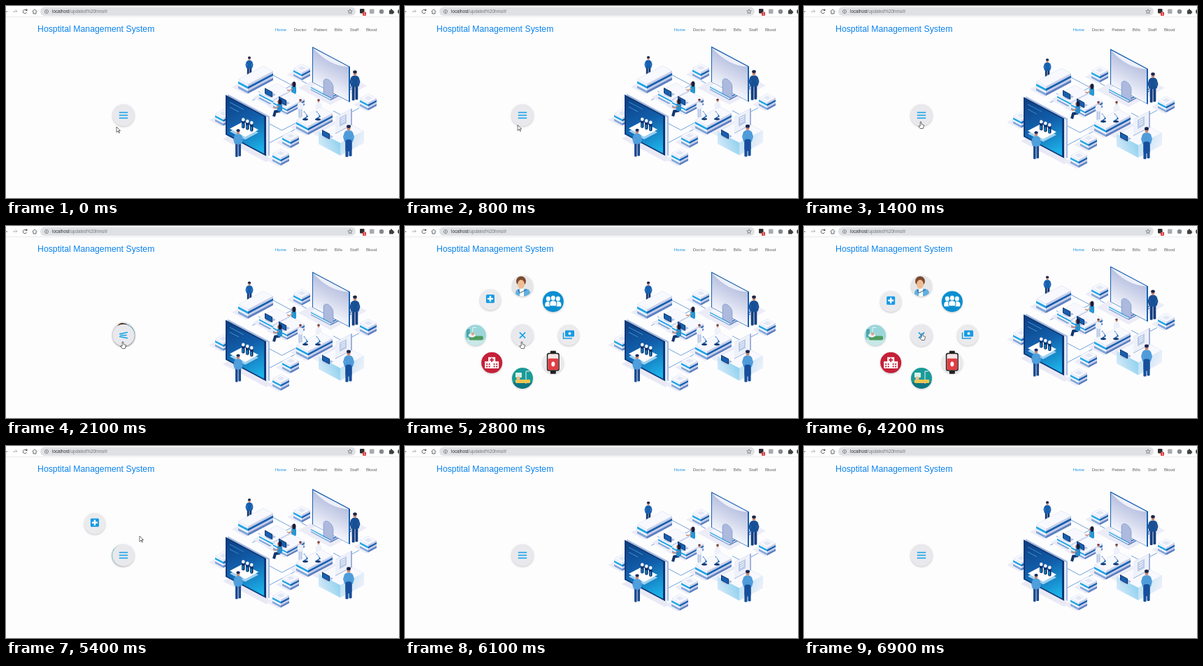
An HTML page with a canvas for the animation above (7000 ms loop, 562 by 275 pixels).

```html
<!DOCTYPE html>
<html lang="en">
<head>
<meta charset="utf-8">
<style>
html, body { margin: 0; height: 100%; overflow: hidden; background: #fdfdfe; }
canvas { display: block; }
</style>
</head>
<body>
<canvas id="stage" width="562" height="275"></canvas>
<script>
const c = document.getElementById('stage').getContext('2d');
const NAVY = '#12366f', BLUE = '#1760b0', CYAN = '#1ba5e6', PALE = '#eef1fa', LILAC = '#c6cee9';
const SKIN = '#c98a78', GREY = '#5f6368', WHITE = '#fff', BUTTON = '#ebebee';
const LOOP = 7000, OPEN = 2050, CLOSE = 4730, HUB = [168, 156.5];

// ---------- drawing helpers ----------
function rect(fill, x, y, w, h, r = 0) {
  c.beginPath(); c.roundRect(x, y, w, h, r);
  c.fillStyle = fill; c.fill();
}
function oval(fill, x, y, rx, ry = rx) {
  c.beginPath(); c.ellipse(x, y, rx, ry, 0, 0, 7);
  c.fillStyle = fill; c.fill();
}
function trace(...pts) {
  c.beginPath();
  for (let i = 0; i < pts.length; i += 2) c.lineTo(pts[i], pts[i + 1]);
}
function line(color, width, ...pts) {
  trace(...pts);
  c.strokeStyle = color; c.lineWidth = width; c.stroke();
}
function ring(color, width, x, y, r, end = 7) {
  c.beginPath(); c.arc(x, y, r, .3, end);
  c.strokeStyle = color; c.lineWidth = width; c.stroke();
}
function cross(color, x, y, size, width) {
  rect(color, x - size, y - width / 2, size * 2, width);
  rect(color, x - width / 2, y - size, width, size * 2);
}
function text(str, x, y, size, color) {
  c.font = `${size}px "Liberation Sans", Arial, sans-serif`;
  c.fillStyle = color; c.fillText(str, x, y);
  return x + c.measureText(str).width;
}
function fade(w, h, ...colors) {
  const g = c.createLinearGradient(0, 0, w, h);
  colors.forEach((color, i) => g.addColorStop(i / (colors.length - 1), color));
  return g;
}
function within(matrix, draw) {
  c.save(); c.transform(...matrix); draw(); c.restore();
}
const at = (x, y, draw) => within([1, 0, 0, 1, x, y], draw);

// ---------- isometric parts ----------
const S = 0.53;
const leftWall = (x, y, draw) => within([1, S, 0, 1, x, y], draw);
const rightWall = (x, y, draw) => within([1, -S, 0, 1, x, y], draw);
const floor = (x, y, draw) => within([1, -S, -1, -S, x, y], draw);

// (x, y) is the front corner of the top; a runs back left, b back right
function box(x, y, a, b, h) {
  floor(x, y + h, () => rect('#ececf7', -3, 0, b + 3, a + 6));
  const bands = (left, w, colors) => colors.forEach((color, i) => rect(color, left, h * i * .25, w, h * .26));
  leftWall(x, y, () => bands(-a, a, [PALE, CYAN, PALE, '#7fa6d8']));
  rightWall(x, y, () => bands(0, b, [LILAC, BLUE, LILAC, '#5d7fc0']));
  floor(x, y, () => {
    rect('#dfe5f4', 0, 0, b, a);
    rect('#f8f9fe', .6, .6, b - 1.2, a - 1.2);
  });
}
function crate(x, y) {
  box(x, y, 12, 12, 11);
  floor(x, y, () => rect('#e3e8f6', 3, 3, 6, 6));
}
function cable(x0, y0, x1, y1) {
  const run = (x1 - x0 + (y1 - y0) / S) / 2;
  line('#4f8bd0', .8, x0, y0, x0 + run, y0 + run * S, x1, y1);
}
function person(x, feet, h, coat, legs, hair = '#1b2447') {
  within([h / 40, 0, 0, h / 40, x, feet - h], () => {
    rect(legs, -4, 18, 3.6, 22, 1);
    rect(legs, .4, 18, 3.6, 21, 1);
    rect(coat, -4.5, 7, 9, 15, 3);
    for (const side of [-1, 1]) line(coat, 2.2, side * 4, 9, side * 5.8, 15, side * 4, 21);
    oval(SKIN, 0, 4, 2.2, 3.2);
    oval(hair, 0, 2, 2.6, 2);
  });
}
function seated(x, y, shirt) {
  line(NAVY, 4, x + 1, y + 7, x - 6, y + 8, x - 8, y + 15);
  rect(shirt, x - 3, y - 4, 7, 12, 3);
  line(SKIN, 1.5, x - 1, y, x - 6, y + 3, x - 9, y + 2);
  oval(SKIN, x - 1, y - 6, 2, 2.8);
  oval('#151e40', x + 1, y - 6, 2.5, 4);
}
function laptop(x, y) {
  floor(x, y + 8, () => rect('#a9bbdf', 0, 0, 8, 8));
  leftWall(x - 8, y - 6, () => {
    rect(NAVY, 0, 0, 11, 8);
    rect(BLUE, 1, 1, 9, 6);
  });
}
function microscope(x, y) {
  oval(NAVY, x, y + 7, 4, 1.6);
  line(BLUE, 1.5, x - 2, y + 6, x + 3, y + 3, x - 2, y - 4);
  line(PALE, 2.2, x - 2, y - 3, x + 1, y + 2);
}
function upperScreen() {
  floor(466, 134, () => rect('#ececf7', -8, -6, 52, 46));
  box(464, 129, 28, 30, 6);
  leftWall(438, 58, () => {
    rect(BLUE, 0, 0, 54, 51);
    rect(fade(0, 50, '#b4bedf', '#d3d8ec', '#f4f5fc'), 1, 1.5, 51, 49);
    c.beginPath(); c.moveTo(1, 1.5); c.quadraticCurveTo(24, 15, 52, 1.5);
    c.fillStyle = '#eef0fa'; c.fill();
    rect('#adb9dd', 16, 35, 14, 24, [7, 7, 0, 0]);
    c.setLineDash([1, 1]); c.strokeStyle = BLUE; c.lineWidth = .6; c.stroke(); c.setLineDash([]);
  });
}
function lowerScreen() {
  floor(376, 221, () => rect('#e9e9f6', -4, 0, 8, 62));
  leftWall(317, 126, () => rect('#a9bce0', 0, 0, 60, 57));
  leftWall(314, 127, () => {
    rect('#e3eaf7', 0, 0, 61, 57);
    rect('#0d3878', 0, 0, 58, 57);
    rect(fade(52, 52, '#0c3c80', '#125fab', '#1cb4ea'), 2, 2, 53, 53);
    for (const w of [20, 13]) rect('#4fb0e2', 6, 27 - w, w, .7);
  });
  floor(346, 189, () => rect('#9fd0ee', -4, 0, 19, 22));
  floor(346, 185, () => rect(WHITE, -4, 0, 19, 22));
  for (let i = 0; i < 3; i++) at(337 + i * 6, 160 + i * 2.2, () => {
    rect('#0a2c66', 0, 0, 4.5, 15, 2);
    rect(PALE, 0, 0, 4.5, 5, 2);
    rect(CYAN, 1, 8, 1.4, 6);
  });
}
function reception() {
  box(478, 197, 31, 34, 3);
  leftWall(478, 196, () => rect(fade(-31, 18, '#8fd2ef', '#d5e9f8'), -31, 0, 31, 18));
  rightWall(478, 196, () => rect(fade(34, 18, '#bfe2f4', PALE), 0, 0, 34, 18));
  laptop(460, 183);
  rightWall(471, 159, () => {
    rect('#9fb1d9', 0, 0, 24, 24);
    rect(PALE, 0, 0, 22, 23);
    rect('#bacbe8', 6, 4, 10, 13);
    for (let i = 0; i < 3; i++) rect(WHITE, 8, 6 + i * 3, 6, 1);
  });
  person(490, 216, 46, '#4f9cda', '#174f9c', '#172653');
  rect('#174f9c', 485.5, 191, 9, 17, 3);
}
function illustration() {
  cable(382, 99, 396, 120);
  cable(423, 107, 442, 116);
  cable(361, 122, 352, 135);
  cable(376, 168, 415, 167);
  cable(468, 150, 505, 146);
  cable(376, 205, 418, 174);

  person(348, 104, 32, BLUE, NAVY);
  box(346, 112, 14, 36, 13);
  crate(423, 95);
  upperScreen();
  person(499, 135, 43, '#174f95', '#143f80');
  crate(518, 138);
  crate(311, 160);

  for (const i of [0, 1]) {
    const x = 382 + i * 20, y = 134 + i * 12;
    box(x, y, 20, 25, 9);
    laptop(x - 4, y - 11);
    seated(x + 29 - i * 40, y - 16 + i * 13, i ? '#2a8ccb' : '#2498d5');
  }

  for (const x of [421, 447]) person(x, 160, 27, PALE, '#bacae7', '#6b3b39');
  box(432, 172, 17, 35, 12);
  for (const x of [428, 446]) microscope(x, 155);

  lowerScreen();
  person(332, 216, 40, '#4f9fdc', '#1d4c91', '#152b60');
  crate(407, 192);
  crate(393, 217);
  reception();
}

// ---------- menu icons, drawn around (0, 0) ----------
function disc(color, r = 15) {
  c.save();
  c.shadowColor = 'rgba(0,0,0,.22)'; c.shadowBlur = 3; c.shadowOffsetY = 1;
  oval(color, 0, 0, r);
  c.restore();
}
function scene(color, draw) {
  disc(color);
  c.save(); c.clip(); draw(); c.restore();
}
const doctor = () => scene('#e6e6e9', () => {
  rect('#5fb0df', -10, 4, 21, 16, 6);
  rect(WHITE, -4, 3, 6, 14, 2);
  line('#28577d', 1, -6, 5, -4, 10, 6, 5);
  oval('#7b4a2d', -2, -7, 7);
  oval('#efbd94', -2, -2.5, 5, 6.5);
});
function team() {
  disc('#0b8fd1');
  for (const x of [-7, 7, 0]) at(x, x ? -1 : -2, () => {
    rect('#0b8fd1', -5.5, 0, 11, 10, 4);
    oval(WHITE, 0, -3, 3, 3.4);
    rect(WHITE, -4.5, 1, 9, 7, [4, 4, 1, 1]);
  });
}
function money() {
  disc(BUTTON);
  rect('#159be3', -5, -7, 13, 9, 1);
  oval(BUTTON, 1.5, -2.5, 2.1);
  line('#159be3', 1.5, -7.5, -4, -7.5, 4.5, 5, 4.5);
}
function bloodBag() {
  disc(BUTTON);
  rect('#222', -4, -17, 8, 33, 1);
  rect('#222', -9, -14, 18, 26, 3);
  rect('#f7e6e6', -7.5, -12.5, 15, 23, 2);
  rect('#df3f43', -7.5, -6, 15, 16.5, 2);
  oval(WHITE, 0, 2, 2.5, 3.5);
}
const ward = () => scene('#199b98', () => {
  rect('#0e7581', -15, 6, 30, 10);
  rect('#d9f1e6', -10, -8, 9, 7, 1);
  line(PALE, 1, 5, 8, 5, -10, 10, -10);
  rect('#f0c652', -10, 2, 21, 5, 1);
  oval('#efb990', -6, 0, 2.6);
});
function hospital() {
  disc('#c52038');
  rect(WHITE, -10, -2, 20, 10);
  rect(WHITE, -5, -8, 10, 16);
  cross('#c52038', 0, -4, 3, 1.8);
  for (const x of [-8, -4.5, 2.5, 6]) for (const y of [1, 4.5]) rect('#c52038', x, y, 2, 2);
}
const bed = () => scene('#9bd7da', () => {
  rect('#c7e9e7', -15, 6, 30, 10);
  rect('#48a9ae', -13, -9, 5, 12);
  line(PALE, 1, -4, 8, -4, -11, 1, -11);
  rect('#4f9c61', -9, 1, 20, 6, 2);
  oval(PALE, -5, 0, 5, 3);
  oval('#d8a584', -4, -2, 2.2);
});
function plus() {
  disc(BUTTON);
  rect('#159be3', -6, -7.5, 12, 12, 1.5);
  cross(WHITE, 0, -1.5, 4, 2.4);
}
const items = [doctor, team, money, bloodBag, ward, hospital, bed, plus];

// ---------- motion ----------
const clamp = v => Math.min(1, Math.max(0, v));
const smooth = v => v * v * (3 - 2 * v);
const inOut = v => v < .5 ? 4 * v ** 3 : 1 - 4 * (1 - v) ** 3;
const bezier = (s, p1, p2) => 3 * (1 - s) ** 2 * s * p1 + 3 * (1 - s) * s * s * p2 + s ** 3;
// cubic-bezier(.935, 0, .34, 1.33)
function spring(x) {
  let lo = 0, hi = 1;
  while (hi - lo > 1e-5) {
    const mid = (lo + hi) / 2;
    if (bezier(mid, .935, .34) < x) lo = mid; else hi = mid;
  }
  return bezier(hi, 0, 1.33);
}
function spread(t, i) {
  return t < CLOSE
    ? spring(clamp((t - OPEN) / (180 + 100 * i)))
    : 1 - inOut(clamp((t - CLOSE - 90 * i) / 160));
}
function hub(t) {
  const p = clamp((t - OPEN) / 200) - clamp((t - CLOSE) / 200);
  disc('#e9e9ed', 15.7);
  for (const side of [-1, 0, 1]) at(0, side * 4 * (1 - p), () => {
    c.rotate(side * p * Math.PI / 4);
    const half = side ? 6.2 - p * .4 : 6.2 * (1 - p);
    rect('#14a2e8', -half, -.8, half * 2, 1.6);
  });
}
function menu(t) {
  items.forEach((draw, i) => {
    const p = spread(t, i), angle = (i - 2) * Math.PI / 4;
    const r = i % 2 ? 62 : 66, lift = i % 4 === 2 ? 0 : 4.5;
    if (p > .005) at(HUB[0] + r * Math.cos(angle) * p, HUB[1] + (r * Math.sin(angle) - lift) * p, draw);
  });
  at(...HUB, () => hub(t));
}

// ---------- cursor ----------
const START = [158, 173], HIDE = 6000;
const moves = [[600, 167, 166], [3000, 169, 154], [4850, 191, 129]]; // time, x, y
function outline(...pts) {
  trace(...pts); c.closePath();
  c.fillStyle = WHITE; c.fill();
  c.strokeStyle = '#333'; c.lineWidth = .7; c.stroke();
}
const arrow = () => outline(0, 0, 0, 8, 2, 6, 3.5, 9, 4.5, 8.5, 3, 5.6, 5.6, 5.6);
const hand = () => outline(-.8, 0, .8, 0, 1, 3.4, 4.6, 4.6, 3.3, 9.5, -.9, 9.5, -3.4, 6, -.8, 6);
function cursor(t) {
  if (t > HIDE) return;
  let [x, y] = START;
  for (const [begin, mx, my] of moves) {
    const e = smooth(clamp((t - begin) / 500));
    x += (mx - x) * e;
    y += (my - y) * e;
  }
  at(x, y, Math.hypot(x - HUB[0], y - HUB[1]) < 15 ? hand : arrow);
}

// ---------- page ----------
function browserBar() {
  rect(WHITE, 0, 0, 562, 15);
  rect('#dfe1e4', 49, 1.5, 451, 12.5, 6.2);
  rect('#e3e4e7', 0, 15, 562, .7);
  line(GREY, 1, 0, 8, 2, 8);
  line('#a5a8ac', 1, 10, 8, 16, 8, 13.5, 5.5);
  ring(GREY, 1, 27, 8, 2.7, 5.5);
  rect(GREY, 28, 4.5, 2.5, 2.5);
  line(GREY, 1, 37.5, 8, 41, 4.8, 44.5, 8);
  line(GREY, 1, 39, 7.5, 39, 11, 43, 11, 43, 7.5);
  ring(GREY, .7, 58, 8, 2.6);
  rect(GREY, 57.6, 6.5, .8, 3);
  const end = text('localhost', 66, 10.4, 6.3, '#303236');
  text('/updated%20hms/#', end, 10.4, 6.3, '#75787c');
  const star = Array.from({ length: 22 }, (_, i) => {
    const k = i >> 1, r = k % 2 ? 1.5 : 3.4, a = k * Math.PI / 5 - Math.PI / 2;
    return i % 2 ? 8 + r * Math.sin(a) : 492 + r * Math.cos(a);
  });
  line(GREY, .7, ...star);
  rect('#2c2d31', 506, 4, 6.5, 6.5, 1);
  rect('#d83a3e', 510, 8.5, 5, 5.5, 1);
  text('1', 511.5, 13, 4.5, WHITE);
  rect('#a8abb0', 520, 4.5, 6.5, 6.5, 1);
  oval('#85898e', 537, 8, 3.2);
  rect('#3c4043', 548, 6, 6, 5.5, .7);
  oval('#3c4043', 551, 5.5, 1.3);
  oval('#3c4043', 554, 8.7, 1.3);
  oval('#444', 562, 8, 1.8, 3);
}
function page() {
  rect('#fdfdfe', 0, 0, 562, 275);
  browserBar();
  text('Hosptital Management System', 45, 37, 12.3, '#0b83ec');
  let x = 384.7;
  for (const label of ['Home', 'Doctor', 'Patient', 'Bills', 'Staff', 'Blood'])
    x = text(label, x, 36, 6.05, label === 'Home' ? '#1693df' : '#5b5d62') + 10.8;
}
function frame() {
  const t = Math.floor(performance.now() % LOOP / 100) * 100;
  page();
  at(0, 3.7 - 4.5 * Math.cos((t - 450) * Math.PI / 2000), illustration);
  menu(t);
  cursor(t);
  requestAnimationFrame(frame);
}
frame();
</script>
</body>
</html>
```
